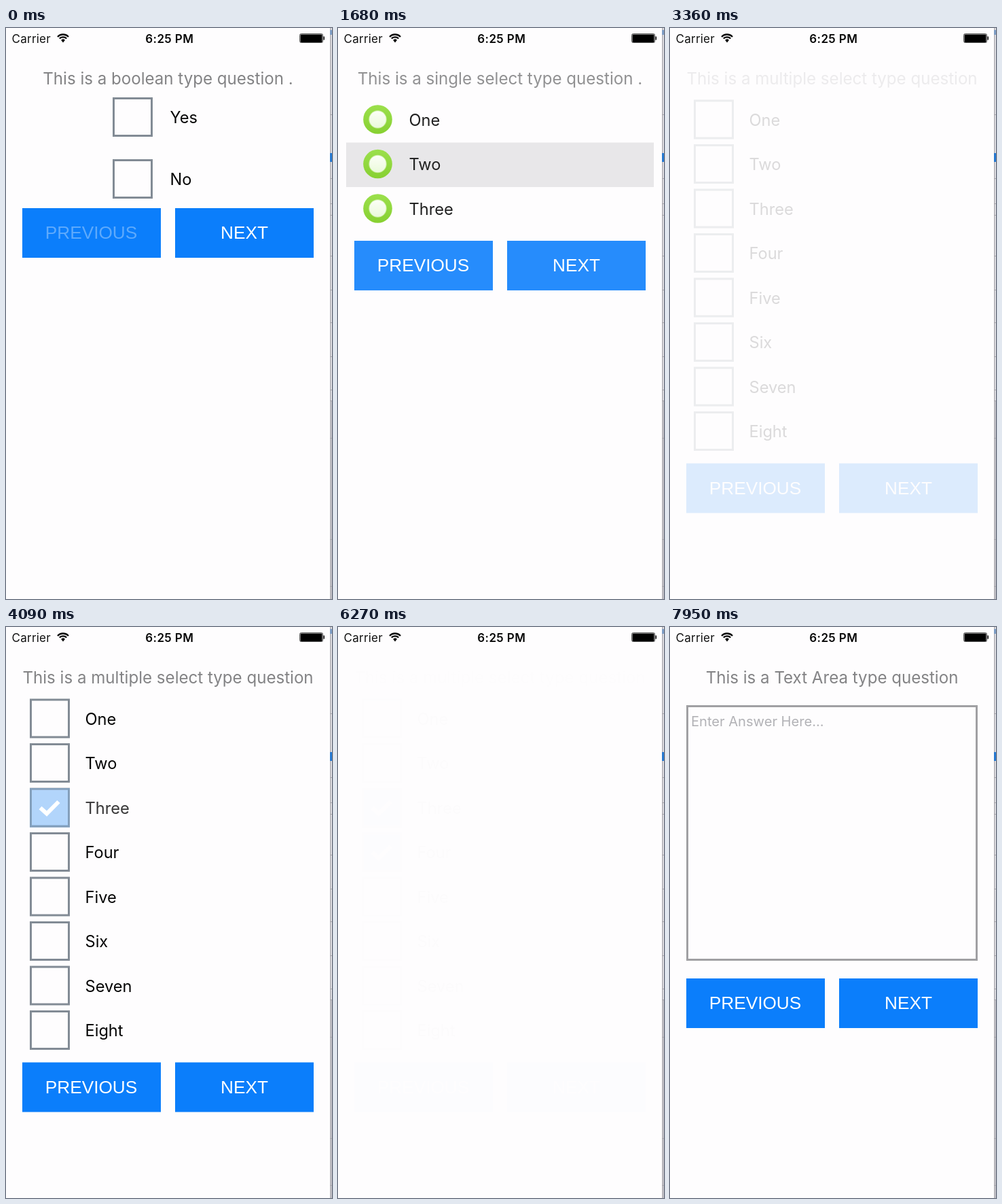
An HTML page with a canvas that plays this animation: 480x840 px, repeating every 8000 ms.

```html
<!DOCTYPE html>
<html lang="en">
<head>
<meta charset="utf-8">
<title>Survey form</title>
<style>
  html, body { margin: 0; width: 100%; height: 100%; overflow: hidden; background: #fefdfe; }
  canvas { display: block; width: 480px; height: 840px; }
</style>
</head>
<body>
<canvas id="stage" width="480" height="840"></canvas>
<script>
const ctx = document.getElementById('stage').getContext('2d');
const LOOP = 8000;
const FADE = 300;
const BG = '#fefdfe';
const BLUE = '#0b7efb';
const SANS = 'Inter, "Open Sans", sans-serif';
const ROW = 65.5;
const NUMBERS = ['One', 'Two', 'Three', 'Four', 'Five', 'Six', 'Seven', 'Eight'];
const CHECKED_AT = { Three: 3973, Four: 4850 };

// Each page fades in from `from`; the one before it fades out just ahead.
const PAGES = [
  { from: -FADE, draw: booleanPage },
  { from: 1443, draw: singlePage },
  { from: 3290, draw: multiplePage },
  { from: 6286, draw: textPage }
];

function ease(x) {
  const p = Math.min(1, Math.max(0, x));
  return p * p * (3 - 2 * p);
}

function rect(x, y, w, h, color) {
  ctx.fillStyle = color;
  ctx.fillRect(x, y, w, h);
}

function frame(x, y, w, h, line, color) {
  ctx.strokeStyle = color;
  ctx.lineWidth = line;
  ctx.strokeRect(x + line / 2, y + line / 2, w - line, h - line);
}

function text(str, x, y, font, color, align = 'left', spacing = 0) {
  ctx.font = font;
  ctx.fillStyle = color;
  ctx.textAlign = align;
  ctx.letterSpacing = spacing + 'px';
  ctx.fillText(str, x, y);
}

function title(str) {
  text(str, 238.5, 83, '24.1px ' + SANS, '#838385', 'center');
}

function label(str, x, midY) {
  text(str, x, midY + 8.5, '23.6px ' + SANS, '#050505');
}

function buttons(y, first = false) {
  const font = '26.2px "Liberation Sans", Arial, sans-serif';
  rect(24, y, 204, 73, BLUE);
  rect(249, y, 204, 73, BLUE);
  text('PREVIOUS', 125.5, y + 45, font, first ? 'rgba(255,255,255,.34)' : '#fff', 'center');
  text('NEXT', 351, y + 45, font, '#fff', 'center');
}

function box(x, y) {
  frame(x, y, 59, 58, 3, '#828b95');
}

function tick(x, y) {
  ctx.strokeStyle = '#fff';
  ctx.lineWidth = 6;
  ctx.lineJoin = 'miter';
  ctx.beginPath();
  ctx.moveTo(x - 13.5, y);
  ctx.lineTo(x - 4, y + 8.5);
  ctx.lineTo(x + 13.5, y - 9);
  ctx.stroke();
}

function disc(x, y, r, top, bottom) {
  const g = ctx.createLinearGradient(0, y - r, 0, y + r);
  g.addColorStop(0, top);
  g.addColorStop(1, bottom);
  ctx.fillStyle = g;
  ctx.beginPath();
  ctx.arc(x, y, r, 0, Math.PI * 2);
  ctx.fill();
}

function booleanPage() {
  title('This is a boolean type question .');
  ['Yes', 'No'].forEach((name, i) => {
    box(157, 102 + i * 91);
    label(name, 241.5, 131.5 + i * 91);
  });
  buttons(265, true);
}

function singlePage() {
  title('This is a single select type question .');
  rect(12, 168.5, 453, ROW, '#e5e4e6');
  NUMBERS.slice(0, 3).forEach((name, i) => {
    const y = 135 + i * ROW;
    disc(58.5, y - 0.5, 21.3, '#8fdc36', '#78ca18');
    disc(58.5, y - 0.5, 13.2, '#c8ee9c', '#b8e680');
    disc(58.5, y - 0.5, 12.2, '#fbfff5', '#e8f8d6');
    label(name, 104.5, y);
  });
  buttons(313);
}

function multiplePage(t) {
  title('This is a multiple select type question');
  NUMBERS.forEach((name, i) => {
    const y = 135 + i * ROW;
    const p = name in CHECKED_AT ? ease((t - CHECKED_AT[name]) / FADE) : 0;
    ctx.globalAlpha = 1 - p;
    box(35, y - 29.5);
    label(name, 116.5, y);
    ctx.globalAlpha = p;
    if (p > 0) {
      rect(35, y - 29, 59, 58, '#1f88f4');
      frame(35, y - 29, 59, 58, 3, '#949598');
      label(name, 116.5, y);
      ctx.globalAlpha = 1;
      tick(64, y);
    }
    ctx.globalAlpha = 1;
  });
  buttons(640.5);
}

function textPage() {
  title('This is a Text Area type question');
  frame(24, 115, 429, 376, 3, '#a0a0a3');
  text('Enter Answer Here...', 31, 146, '20.1px ' + SANS, '#b2b2b6');
  buttons(517);
}

function statusBar() {
  text('Carrier', 8.5, 21.5, '17px ' + SANS, '#111', 'left', 0.25);
  text('6:25 PM', 240.8, 21.5, '600 17px ' + SANS, '#050505', 'center', 0.4);

  ctx.strokeStyle = '#050505';
  ctx.lineWidth = 2.3;
  for (const r of [7.2, 11]) {
    ctx.beginPath();
    ctx.arc(84, 20.5, r, -Math.PI * 0.76, -Math.PI * 0.24);
    ctx.stroke();
  }
  ctx.fillStyle = '#050505';
  ctx.beginPath();
  ctx.moveTo(84, 21.5);
  ctx.arc(84, 20.5, 4, -Math.PI * 0.76, -Math.PI * 0.24);
  ctx.fill();

  ctx.lineWidth = 1;
  ctx.strokeStyle = '#555';
  ctx.beginPath();
  ctx.roundRect(432.5, 8.5, 34, 13, 2);
  ctx.stroke();
  rect(433.5, 9.5, 32, 11.5, '#000');
  rect(467.5, 12.5, 1.5, 5, '#050505');
}

// Sliver of the window behind the phone.
function rightEdge() {
  rect(477, 0, 3, 840, '#e6e5ea');
  rect(477, 0, 1.6, 840, '#b3b2b7');
  rect(478, 548, 2, 292, '#bdbcc2');
  for (const y of [127, 221, 258, 275, 335, 385, 433, 483, 532, 548, 603, 752, 821]) {
    rect(477, y, 3, 1, '#a5a4aa');
  }
  rect(477, 3, 3, 7, '#7d9cc4');
  rect(477, 184, 3, 13, '#2478d0');
}

function draw(t) {
  rect(0, 0, 480, 840, BG);
  PAGES.forEach((page, i) => {
    const next = PAGES[i + 1];
    const until = next ? next.from : LOOP + FADE;
    if (t < page.from || t >= until) return;
    const shown = ease((t - page.from) / FADE) * ease((until - t) / FADE);
    page.draw(t);
    ctx.globalAlpha = 1 - shown;
    rect(0, 0, 480, 840, BG);
    ctx.globalAlpha = 1;
  });
  statusBar();
  rightEdge();
}

const start = performance.now();
function loop() {
  draw((performance.now() - start) % LOOP);
  requestAnimationFrame(loop);
}
loop();
</script>
</body>
</html>
```
